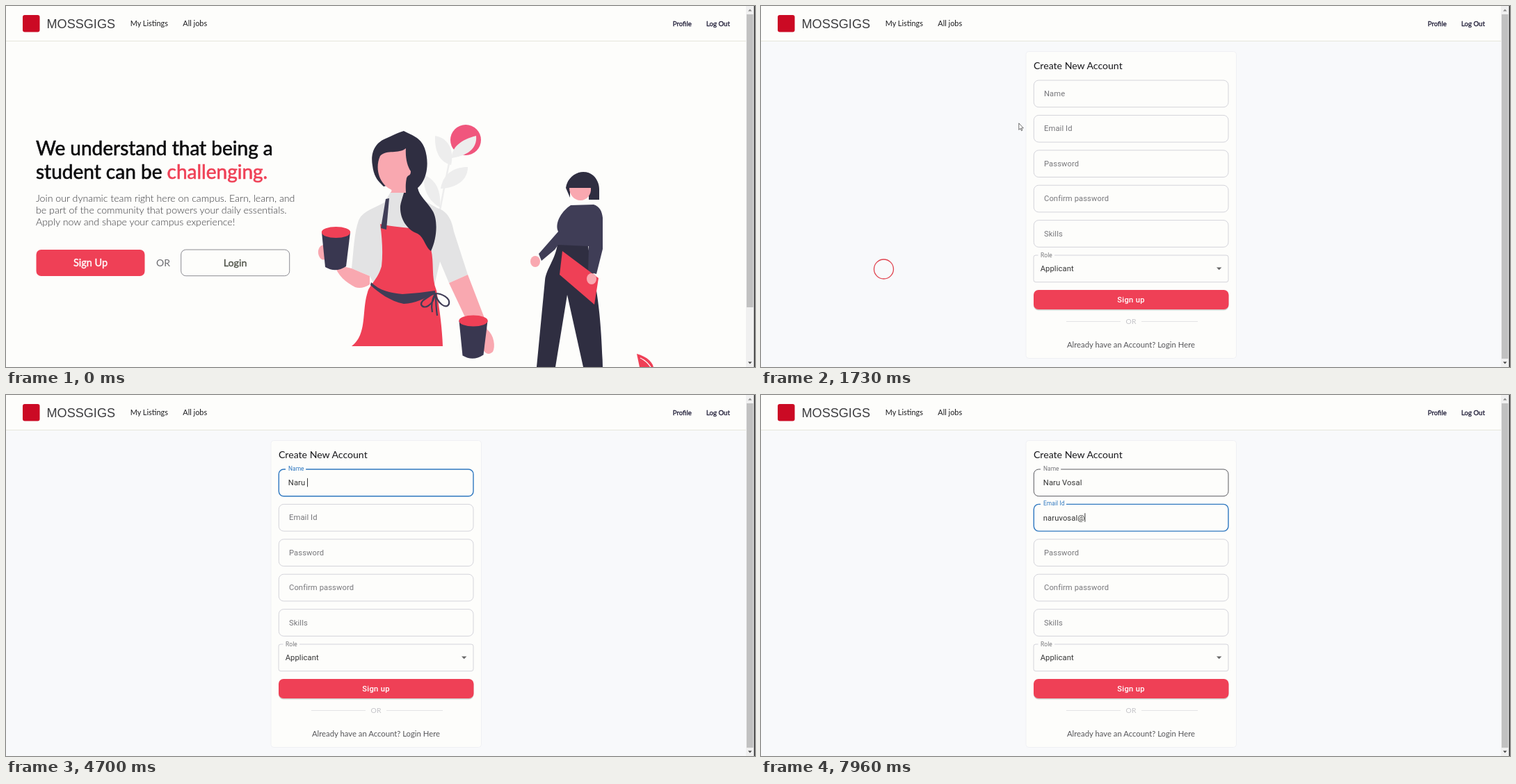
An HTML page for the animation above (8000 ms loop, 1077 by 520 pixels).

```html
<!DOCTYPE html>
<html lang="en">
<head>
<meta charset="utf-8">
<title>Job board sign-up</title>
<style>
  html, body { margin: 0; width: 100%; height: 100%; overflow: hidden; background: #fdfdfb; }
  svg { display: block; width: 1077px; height: 520px; }
  text { font-family: Lato, "Open Sans", sans-serif; white-space: pre; }
  .brand { font-family: "Liberation Sans", Arial, sans-serif; }
  .ui { font-family: Roboto, Inter, sans-serif; font-size: 11.2px; letter-spacing: .105px; }
  .mid { text-anchor: middle; }
  .medium { stroke-width: .35px; paint-order: stroke; }
  .title { font-size: 28px; stroke-width: .6px; }
  .para { font-size: 14.2px; font-weight: 300; fill: #38383c; }
</style>
</head>
<body>
<svg viewBox="0 0 1077 520" xmlns="http://www.w3.org/2000/svg">
  <rect width="1077" height="520" fill="#fdfdfb"/>

  <g id="home">
    <g class="title medium">
      <text x="43" y="215" fill="#0b0b0d" stroke="#0b0b0d">We understand that being a</text>
      <text x="43" y="249" fill="#0b0b0d" stroke="#0b0b0d">student can be <tspan fill="#ef4056" stroke="#ef4056">challenging.</tspan></text>
    </g>
    <g class="para">
      <text x="43" y="282">Join our dynamic team right here on campus. Earn, learn, and</text>
      <text x="43" y="299">be part of the community that powers your daily essentials.</text>
      <text x="43" y="315.5">Apply now and shape your campus experience!</text>
    </g>
    <rect x="43.5" y="351" width="156" height="38" rx="7" fill="#ef4056"/>
    <text class="mid medium" x="121.5" y="375" font-size="14.5" fill="#fff" stroke="#fff">Sign Up</text>
    <text class="mid" x="226" y="374.5" font-size="14" fill="#6c6c70">OR</text>
    <rect x="251.7" y="351" width="156" height="37.7" rx="7" fill="#fdfdfb" stroke="#6f6f78" stroke-width=".8"/>
    <text class="mid medium" x="329.5" y="375" font-size="14.3" fill="#4d5147" stroke="#4d5147">Login</text>

    <!-- plant -->
    <circle cx="661" cy="193" r="22" fill="#f0567d"/>
    <g fill="#ededed">
      <path d="M617 187C635 190 645 206 640 229C624 225 616 210 617 187Z"/>
      <path d="M676 187C655 192 640 204 641 219C662 216 678 206 676 187Z"/>
      <path d="M664 232C640 232 628 245 625 263C646 262 664 252 664 232Z"/>
      <path d="M602 244C618 250 626 266 624 290C607 281 598 261 602 244Z"/>
      <path d="M640 213Q632 250 622 305" fill="none" stroke="#ededed" stroke-width="2.5"/>
    </g>

    <!-- barista -->
    <path fill="#e3e3e4" d="M553 268H580L620 291C636 296 641 309 644 325L664 387L637 399L624 368L616 402H530L523 389L497 378C500 350 501 325 507 309C512 296 528 292 544 283Z"/>
    <g fill="#f9a8b0">
      <path d="M472 372L497 378L523 389V401C516 406 508 407 502 405C489 398 477 389 472 372Z"/>
      <path d="M458 344C450 344 447 353 450 360C453 367 459 367 461 362Z"/>
      <path d="M637 399L664 387L687 447L692 466C702 474 704 491 700 498C694 504 688 500 686 494L661 450Z"/>
    </g>
    <path fill="#ef4056" d="M538 314Q560 319 609 322L611 350C616 370 611 390 619 410C624 440 627 465 628 490H497C520 472 511 440 520 412C523 401 534 395 540 375Q543 350 538 314Z"/>
    <path fill="#2f2e41" d="M572 180C561 183 556 187 548 190C529 197 524 213 527 230C529 247 536 253 543 260L572 252C577 262 569 275 567 288C566 306 576 322 592 328C602 334 603 348 611 353C620 334 621 309 614 296C606 282 594 274 592 262C606 250 609 225 602 205C596 188 582 186 572 180Z"/>
    <path fill="#f9a8b0" d="M538 216C548 206 564 214 575 205C574 218 577 231 582 238C582 246 578 242 576 248C574 258 575 264 575 269H553Q556 265 553 264C539 258 529 236 538 216Z"/>
    <g fill="#3f3d56">
      <path d="M539 320L546 278L551 277L547 322Z"/>
      <path d="M525 398C537 410 552 413 570 415C588 414 602 412 617 410V415C602 420 588 429 572 429C552 425 536 413 524 402Z"/>
    </g>
    <g fill="none" stroke="#3f3d56" stroke-width="2.2">
      <path d="M616 413C607 420 596 424 597 430C600 438 615 432 617 414C626 414 639 420 637 429C633 438 620 428 617 413"/>
      <path d="M617 414Q610 428 613 441M618 414Q618 432 620 446"/>
    </g>
    <g id="cup">
      <path fill="#393750" d="M454 326H495L489 375Q474 385 459 376Z"/>
      <ellipse cx="474.5" cy="326" rx="20.7" ry="8" fill="#ef4056"/>
    </g>
    <use href="#cup" x="197.5" y="127.5"/>

    <!-- student -->
    <path fill="#2f2e41" d="M793 343L837 345C841 380 855 405 858 520H830L807 416L790 520H763L775 395C777 378 790 365 793 343Z"/>
    <ellipse cx="761" cy="368" rx="7" ry="8" fill="#f9a8b0"/>
    <path fill="#3f3d56" d="M812 287L845 286C854 289 857 296 858 305V350L849 386L837 383L838 346L794 344L789 351L770 367L766 357L794 325C788 311 801 294 812 287Z"/>
    <path fill="#ef4056" d="M800 353L852 392L846 430L796 387Z"/>
    <ellipse cx="842" cy="393" rx="7" ry="8" fill="#f9a8b0"/>
    <path fill="#2f2e41" d="M805 262C807 247 820 239 830 239C845 239 853 252 853 264V279H838V262H811V276L805 262Z"/>
    <path fill="#f9a8b0" d="M810 262H841C842 272 835 280 826 280C817 280 810 272 810 262Z"/>
    <path fill="#ef4056" d="M907 501C921 505 929 512 931 520H911Z"/>
    <path d="M912 507Q921 511 927 520" fill="none" stroke="#fdfdfb" stroke-width="1.3"/>
  </g>

  <g id="signup">
    <rect y="51" width="1065" height="469" fill="#f8f9fb"/>
    <rect x="381" y="65.5" width="302.5" height="442" rx="4" fill="#fdfdfb" stroke="#eceef3" stroke-width=".8"/>
    <text x="392" y="90.5" font-size="14.1" fill="#17171b">Create New Account</text>
    <g id="fields"></g>
    <rect x="392" y="359" width="280" height="38.7" rx="3" fill="none" stroke="#c9c9d2" stroke-width=".8"/>
    <rect x="398.5" y="357" width="23.5" height="4" fill="#fdfdfb"/>
    <text class="ui" x="402" y="361.5" style="font-size:8.4px" fill="#77777b">Role</text>
    <text class="ui" x="401.7" y="382" fill="#333">Applicant</text>
    <path d="M655 376.5H662.4L658.7 380.2Z" fill="#666"/>
    <rect x="392" y="410.5" width="280.5" height="28" rx="7" fill="#000" opacity=".18"/>
    <rect x="392" y="409" width="280.5" height="28" rx="7" fill="#ef4056"/>
    <text class="ui mid" x="532" y="427" font-weight="500" style="letter-spacing:.3px" fill="#fff">Sign up</text>
    <path d="M439 454.5H517M547 454.5H628" stroke="#dedee0" stroke-width=".8"/>
    <text class="mid" x="532" y="458.3" font-size="10.4" fill="#c4c4c8">OR</text>
    <text class="mid" x="532" y="492" font-size="11.3" fill="#555559">Already have an Account? Login Here</text>
    <rect id="caret" width=".9" height="12.5" fill="#222"/>
  </g>

  <!-- top bar -->
  <rect width="1065" height="50" fill="#fdfdfb"/>
  <path d="M0 50.5H1065" stroke="#e6e6dc"/>
  <rect x="24" y="13" width="24.5" height="24.5" rx="3" fill="#cb0a24"/>
  <text class="brand" x="58.5" y="31.5" font-size="18.1" fill="#3c3c3f">MOSSGIGS</text>
  <g font-size="10.9" fill="#1d1d20">
    <text x="178.7" y="29.3">My Listings</text>
    <text x="254.3" y="29.3">All jobs</text>
  </g>
  <g class="medium" font-size="9.6" fill="#25233d" stroke="#25233d">
    <text x="958.8" y="29">Profile</text>
    <text x="1007" y="29">Log Out</text>
  </g>

  <!-- scrollbar -->
  <rect x="1064" width="12" height="520" fill="#f0f0f0"/>
  <rect id="thumb" x="1065" y="12" width="9.5" height="422" fill="#c1c1c1"/>
  <path d="M1067 7.5H1072.5L1069.8 4.5Z" fill="#8a8a8a"/>
  <path d="M1067 512.5H1072.5L1069.8 515.5Z" fill="#444"/>
  <rect x="1075.6" width="1.4" height="520" fill="#2c2c2c"/>

  <circle id="ring" fill="none" stroke="#e0434f" stroke-width="1.3"/>
  <g id="pointer">
    <path id="arrow" d="M0 0V9.5L2.2 7.5L3.7 10.8L5 10.2L3.6 7H6.5Z" fill="#fff" stroke="#333" stroke-width=".7"/>
    <path id="hand" d="M-1 -5Q0 -6.2 1 -5V-1L4.3 0Q5 .5 4.8 2L3.7 7H-1.3L-4 2.2Q-3.8 .8 -2.3 1.8L-1 3Z" fill="#fff" stroke="#333" stroke-width=".7"/>
    <path id="beam" d="M-2 -6H2M0 -6V6M-2 6H2" fill="none" stroke="#333" stroke-width=".8"/>
  </g>
</svg>
<script>
const LOOP = 8000, NAV = 1680, FOCUS_NAME = 2350, FOCUS_MAIL = 5900, TYPE_START = 3380;
const BLUE = '#2f78c0', GREY = '#77777b';
const $ = id => document.getElementById(id);
const clamp = v => Math.max(0, Math.min(1, v));
const easeOut = p => 1 - (1 - p) ** 3;
const show = (el, on) => el.setAttribute('visibility', on ? 'inherit' : 'hidden');
const set = (el, attrs) => { for (const k in attrs) el.setAttribute(k, attrs[k]); };

// Each typed value: first key time and time between keys.
const typed = {
  'Name': { value: 'Naru Vosal', from: 3680, gap: 235, focus: FOCUS_NAME, blur: FOCUS_MAIL },
  'Email Id': { value: 'naruvosal@', from: 6350, gap: 170, focus: FOCUS_MAIL, blur: LOOP }
};

const fields = ['Name', 'Email Id', 'Password', 'Confirm password', 'Skills'].map((name, i) => {
  const y = 107 + i * 50.4;
  const g = document.createElementNS('http://www.w3.org/2000/svg', 'g');
  g.innerHTML = `<rect x="392.3" y="${y}" width="279.7" height="38.7" rx="7" fill="none"/>
    <rect x="402" y="${y - 2}" height="4" fill="#fdfdfb"/>
    <text class="ui">${name}</text>
    <text class="ui" x="405.8" y="${y + 23.3}" fill="#333"></text>`;
  $('fields').append(g);
  const [box, notch, label, input] = g.children;
  return { y, box, notch, label, input, ...typed[name] };
});

// time, x, y
const path = [[600, 330, 524], [1100, 178, 385], [1650, 178, 385], [1730, 370.5, 169], [2000, 450, 128], [LOOP, 450, 128]];
const clicks = [[1560, 176.5, 379], [FOCUS_NAME, 450, 128]];

function pointerAt(t) {
  const i = Math.max(1, path.findIndex(p => p[0] > t));
  const [a, b] = [path[i - 1], path[i]];
  const p = clamp((t - a[0]) / (b[0] - a[0]));
  return [a[1] + (b[1] - a[1]) * p, a[2] + (b[2] - a[2]) * p];
}

function drawField(f, t, hover) {
  const focused = t >= f.focus && t < f.blur;
  const p = easeOut(clamp((t - f.focus) / 200)) || 0;
  const scale = 1 - .25 * p;
  const keys = Math.floor((t - f.from) / f.gap) + 1;
  const text = keys > 0 ? f.value.slice(0, keys) : '';
  set(f.box, { stroke: focused ? BLUE : hover ? '#33333a' : '#c9c9d2', 'stroke-width': focused ? 1.4 : .8 });
  set(f.label, {
    transform: `translate(${407 - p} ${f.y + 23 - 21 * p}) scale(${scale})`,
    fill: focused ? BLUE : GREY
  });
  f.notch.setAttribute('width', p ? (f.label.getComputedTextLength() * .75 + 6.5) * p : 0);
  if (f.input.textContent !== text) f.input.textContent = text;
  if (!focused) return;
  const width = text ? f.input.getComputedTextLength() : 0;
  const idle = keys > 0 && keys <= f.value.length ? 0 : t - f.focus;
  set($('caret'), { x: 405.8 + width, y: f.y + 12.8 });
  show($('caret'), idle % 1060 < 530);
}

function drawPointer(t) {
  const [x, y] = pointerAt(t);
  show($('pointer'), t >= 600 && t < TYPE_START);
  $('pointer').setAttribute('transform', `translate(${x} ${y})`);
  const hand = t < NAV && x < 200 && y < 389;
  const beam = t >= NAV && x > 392 && y < 146;
  show($('hand'), hand);
  show($('beam'), beam);
  show($('arrow'), !hand && !beam);

  const click = clicks.find(c => t >= c[0] && t < c[0] + 320);
  show($('ring'), !!click);
  if (click) {
    const age = t - click[0];
    set($('ring'), { cx: click[1], cy: click[2], r: 14 * easeOut(clamp(age / 160)), opacity: 1 - clamp((age - 200) / 120) });
  }
}

function render(t) {
  const home = t < NAV;
  show($('home'), home);
  show($('signup'), !home);
  $('thumb').setAttribute('height', home ? 422 : 496);
  show($('caret'), false);
  fields.forEach((f, i) => drawField(f, t, i === 0 && t >= 1950));
  drawPointer(t);
}

const start = performance.now();
function tick() {
  render((performance.now() - start) % LOOP);
  requestAnimationFrame(tick);
}
tick();
</script>
</body>
</html>
```
